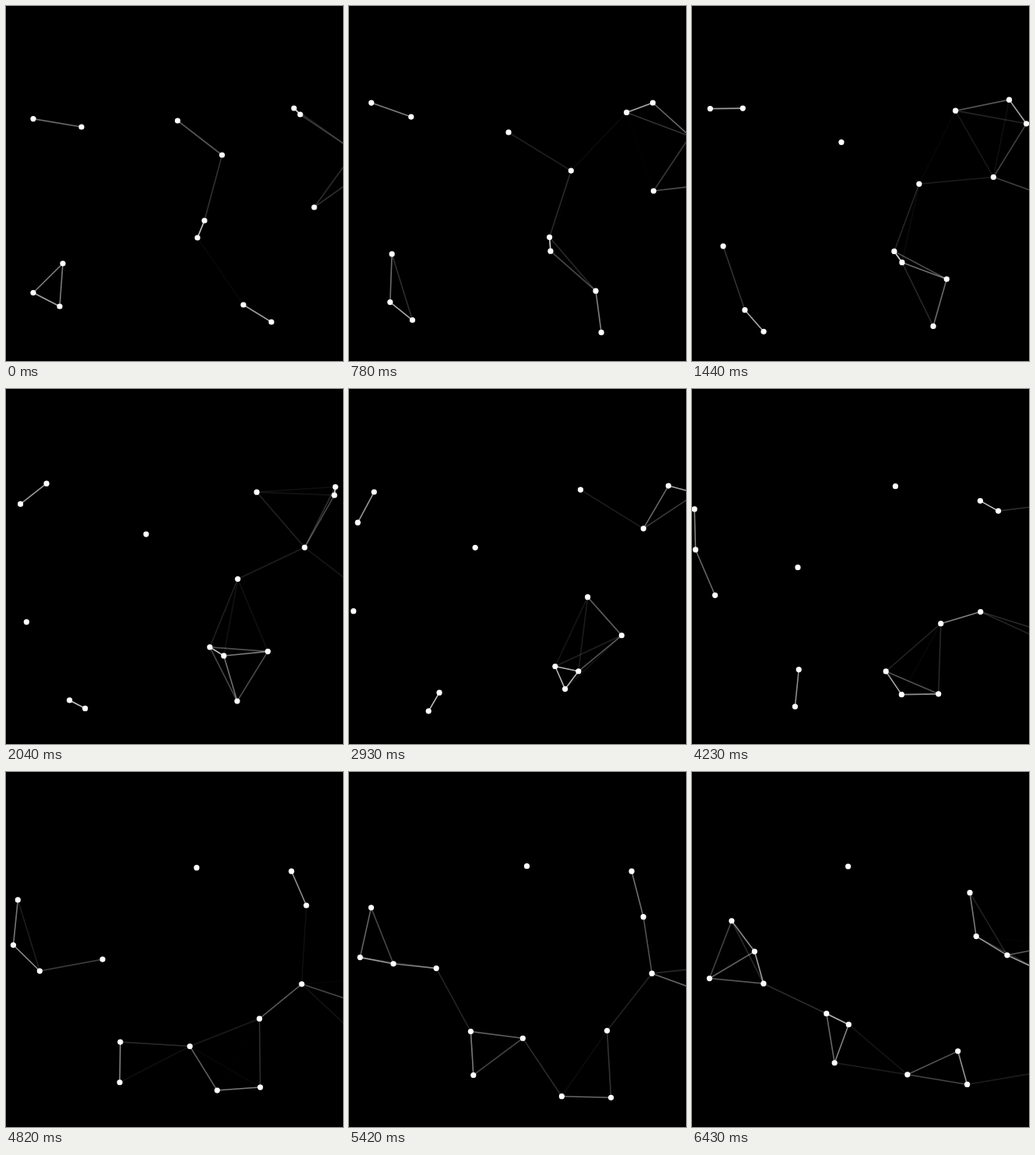
Animation, 433 px wide and 455 px high, one loop 6530 ms. Source, as an HTML page with a canvas:

```html
<!DOCTYPE html>
<html>
<head>
<meta charset="utf-8">
<style>
html, body { margin: 0; width: 100%; height: 100%; overflow: hidden; background: #000; }
canvas { display: block; }
</style>
</head>
<body>
<canvas id="stage" width="433" height="455"></canvas>
<script>
const ctx = document.getElementById('stage').getContext('2d');
const LOOP = 6530, STEP = 59.5, LAST = 108;
const LEFT = 2.6, TOP = 119.1, BOTTOM = 420.1;
const SPEED = 1.655, REACH = 107.5, RADIUS = 3.6;

// Every dot drifts at the same speed: start x, start y, heading in degrees
const dots = [
  [35, 144.6, 253], [97, 155, 217], [220.5, 147, 136], [277.6, 191, 69],
  [255, 275, 83], [246, 297, 53], [305, 383, 304], [341, 405, 141.4],
  [370, 131, 341], [378, 139, 187], [396, 258, 257.4], [73, 330, 214],
  [35, 367.5, 34], [69, 385, 54.5], [448, 186, 242.4], [468, 207, 96.4],
  [484, 427, 257], [528, 391, 251.3]
];

// Reflect a straight path between two walls
function bounce(v, low, high = 1e4) {
  const span = high - low;
  const d = Math.abs(v - low) % (2 * span);
  return low + Math.min(d, 2 * span - d);
}

function place([x, y, heading], n) {
  const angle = heading * Math.PI / 180, way = SPEED * n;
  return {
    x: bounce(x + way * Math.cos(angle), LEFT),
    y: bounce(y + way * Math.sin(angle), TOP, BOTTOM)
  };
}

function link(p, q) {
  const alpha = 1 - Math.hypot(p.x - q.x, p.y - q.y) / REACH;
  if (alpha <= 0) return;
  ctx.strokeStyle = `rgba(255,255,255,${alpha})`;
  ctx.beginPath();
  ctx.moveTo(p.x, p.y);
  ctx.lineTo(q.x, q.y);
  ctx.stroke();
}

function draw() {
  const n = Math.min(LAST, Math.floor(performance.now() % LOOP / STEP));
  const points = dots.map(d => place(d, n));
  ctx.fillStyle = '#000';
  ctx.fillRect(0, 0, 433, 455);
  ctx.lineWidth = 1.6;
  points.forEach((p, i) => points.slice(i + 1).forEach(q => link(p, q)));
  ctx.fillStyle = '#fff';
  for (const p of points) {
    ctx.beginPath();
    ctx.arc(p.x, p.y, RADIUS, 0, 2 * Math.PI);
    ctx.fill();
  }
  requestAnimationFrame(draw);
}
draw();
</script>
</body>
</html>
```
